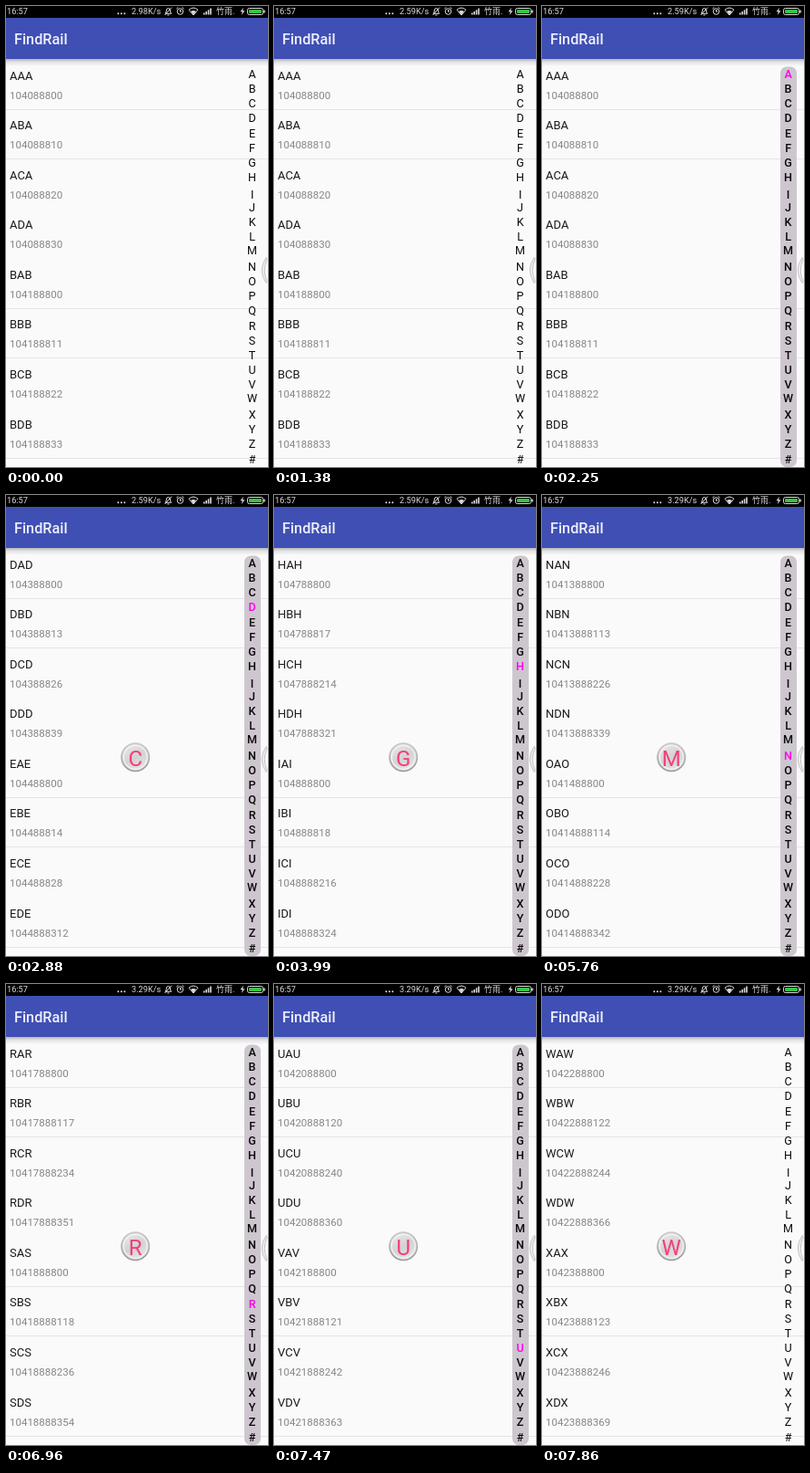
Write an HTML page that moves like this. It is 288 by 505 pixels and loops after 8000 ms.

```html
<!DOCTYPE html>
<html lang="en">
<head>
<meta charset="utf-8">
<title>Indexed list</title>
<style>
  html, body { margin: 0; width: 100%; height: 100%; overflow: hidden; background: #fafafa; }
  svg { display: block; width: 100%; height: 100%; font-family: Roboto, "Noto Sans CJK SC", "Noto Sans CJK", sans-serif; }
  .status { font-size: 9.2px; fill: #dcdcdc; }
  .name { font-size: 13px; fill: #1c1c1c; }
  .phone { font-size: 11.5px; fill: #868686; }
  .index { font-size: 12.6px; text-anchor: middle; }
</style>
</head>
<body>
<svg id="stage" viewBox="0 0 288 505" preserveAspectRatio="none">
  <defs>
    <linearGradient id="shade" x1="0" y1="0" x2="0" y2="1">
      <stop offset="0" stop-color="#b4b4b8"/>
      <stop offset=".4" stop-color="#e2e2e4"/>
      <stop offset="1" stop-color="#fafafa"/>
    </linearGradient>
    <linearGradient id="glass" x1=".2" y1="0" x2=".8" y2="1">
      <stop offset="0" stop-color="#e9e9e9"/>
      <stop offset=".5" stop-color="#d3d3d3"/>
      <stop offset="1" stop-color="#e6e6e6"/>
    </linearGradient>
    <linearGradient id="rim" x1="0" y1="0" x2="0" y2="1">
      <stop offset="0" stop-color="#c9c9c9"/>
      <stop offset="1" stop-color="#979797"/>
    </linearGradient>
  </defs>

  <rect width="288" height="505" fill="#fafafa"/>
  <rect y="58" width="288" height="8" fill="url(#shade)"/>
  <rect y="13" width="288" height="45" fill="#3f4fb4"/>
  <rect width="288" height="13" fill="#000"/>
  <text x="9" y="42.3" font-size="16.3" font-weight="500" fill="#eef0fb">FindRail</text>

  <g class="status">
    <text x="1" y="9.4">16:57</text>
    <text id="speed" x="138" y="9.4"></text>
    <text x="231" y="9.2" font-size="9">竹雨.</text>
  </g>
  <g fill="#dcdcdc">
    <circle cx="123.4" cy="8.3" r="1"/>
    <circle cx="126.9" cy="8.3" r="1"/>
    <circle cx="130.4" cy="8.3" r="1"/>
    <path d="M201 4.2Q206 -.2 211 4.2L206 10Z" fill="none" stroke="#dcdcdc"/>
    <path d="M203 6.1Q206 3.8 209 6.1L206 9.8Z"/>
    <path d="M217 9.6V7.6h1.6v2zM219.4 9.6V6h1.6v3.6zM221.8 9.6V4.3h1.6v5.3zM224.2 9.6V2.5h1.6v7.1z"/>
    <path d="M260.9 1.8L257.6 6.3h2.2L258.9 10l3.6-4.7h-2.3z"/>
  </g>
  <g fill="none" stroke="#dcdcdc">
    <path d="M175 8.3Q176.3 7.4 176.3 5Q176.3 2.5 178.4 2.5Q180.5 2.5 180.5 5Q180.5 7.4 181.8 8.3ZM177.4 10h2M174.6 10L182 1.6"/>
    <circle cx="191.5" cy="6" r="3.3"/>
    <path d="M191.5 4v2.2h1.6M187.4 3l2-1.6M195.6 3l-2-1.6"/>
    <rect x="265.5" y="2.5" width="17" height="7" rx="2"/>
  </g>
  <rect x="267" y="4" width="14" height="4" rx="1" fill="#35c442"/>
  <rect x="283.3" y="4.5" width="1.5" height="3" fill="#dcdcdc"/>

  <g id="rules" fill="#e5e5e5"></g>
  <g id="list"></g>
  <rect id="rail" x="262" y="66.5" width="18" height="438.5" rx="7" fill="#cdc6ce"/>
  <g id="letters"></g>

  <path d="M286 275.5Q276.5 289.5 286 303.5L287 301.5Q281.5 289.5 287 277.5Z" fill="#ededed" stroke="#bdbdbd" stroke-width=".9"/>

  <g id="bubble">
    <circle cx="142.2" cy="287.3" r="15.2" fill="url(#glass)" stroke="url(#rim)" stroke-width="1.6"/>
    <circle cx="142.2" cy="287.3" r="12.9" fill="none" stroke="#f3f3f3" stroke-width="1.2"/>
    <text id="big" x="142.2" y="296.6" font-size="24" text-anchor="middle" fill="#f53d7c"></text>
  </g>
</svg>
<script>
const LOOP = 8000;
const PRESS = 2250, RELEASE = 7860, LAG = 30;
const KEYS = "ABCDEFGHIJKLMNOPQRSTUVWXYZ#";
const ROWS = 8, PITCH = 54.55;
// Moment the finger reaches each letter, from A to W.
const REACH = [PRESS, 2370, 2490, 2880, 3060, 3390, 3750, 3990, 4320, 4560, 4770, 5070,
  5400, 5760, 6120, 6390, 6690, 6930, 7110, 7290, 7440, 7590, 7740];
const SPEEDS = [[0, "2.98K/s"], [1380, "2.59K/s"], [4950, "3.29K/s"]];
// Narrow letters sit lower in the rail, wide ones higher.
const SHIFT = { I: 2.8, J: .7, M: -1.7, W: -1.8 };

const $ = id => document.getElementById(id);

function add(parent, tag, attrs, text = "") {
  const node = document.createElementNS("http://www.w3.org/2000/svg", tag);
  for (const key in attrs) node.setAttribute(key, attrs[key]);
  node.textContent = text;
  parent.appendChild(node);
  return node;
}

const rows = Array.from({ length: ROWS }, (_, r) => ({
  name: add($("list"), "text", { class: "name", x: 4, y: 80.7 + r * PITCH }),
  phone: add($("list"), "text", { class: "phone", x: 4, y: 101.7 + r * PITCH })
}));

for (const y of [113, 167, 331, 385, 495]) {
  add($("rules"), "rect", { y, width: 288, height: 1 });
}

const letters = [...KEYS].map((key, i) => add($("letters"), "text", {
  class: "index", x: 270.6, y: 78.6 + i * 16.23 + (SHIFT[key] || 0)
}, key));

const reached = t => REACH.filter(at => at <= t).length - 1;

function fillRow(row, r, first) {
  const group = first + (r >> 2), item = r % 4;
  const key = KEYS[group];
  row.name.textContent = key + KEYS[item] + key;
  row.phone.textContent = `104${group}888${item}${item * group}`;
}

function render(t) {
  const current = reached(t), shown = reached(t - LAG);
  const touching = t >= PRESS && t < RELEASE;

  $("speed").textContent = SPEEDS.filter(([at]) => at <= t).pop()[1];
  rows.forEach((row, r) => fillRow(row, r, Math.max(current, 0)));

  $("rail").style.display = touching ? "" : "none";
  letters.forEach((node, i) => {
    node.setAttribute("fill", touching && i === current ? "#ff00f0" : "#0a0a0a");
    node.setAttribute("font-weight", touching ? 500 : 400);
  });

  $("bubble").style.display = shown < 0 ? "none" : "";
  $("big").textContent = KEYS[shown] || "";
}

const start = performance.now();
function tick() {
  render((performance.now() - start) % LOOP);
  requestAnimationFrame(tick);
}
tick();
</script>
</body>
</html>
```
